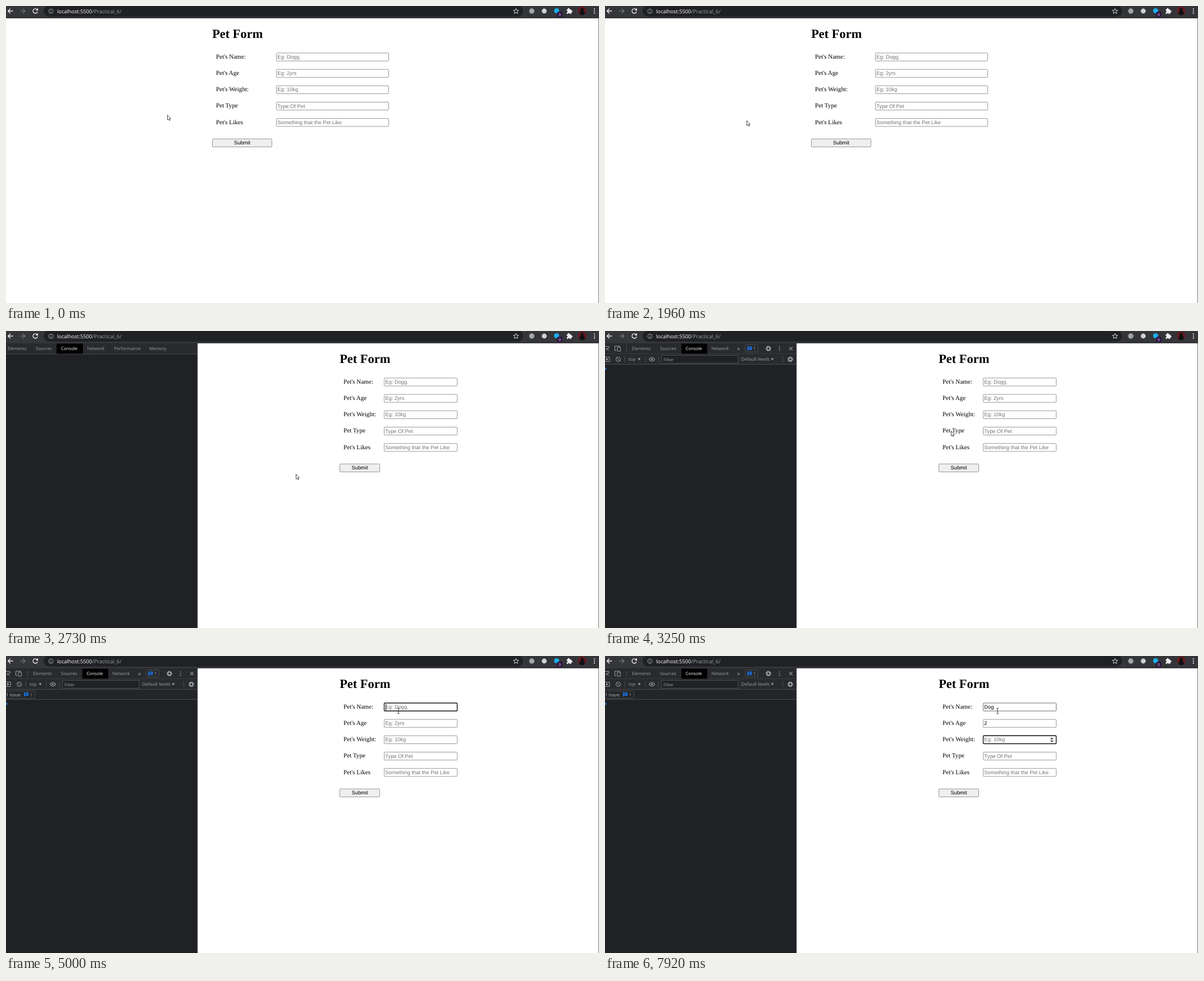
Recreate the animation shown at these times as an HTML page. Size 1056x530 px, loop 8000 ms.

```html
<!DOCTYPE html>
<html lang="en">
<head>
<meta charset="utf-8">
<title>Pet Form</title>
<style>
  html, body { margin: 0; width: 100%; height: 100%; overflow: hidden; background: #fff; }
  svg { display: block; width: 1056px; height: 530px; }
  text { text-rendering: geometricPrecision; white-space: pre; }
  .h1 { font: bold 22.4px "Liberation Serif", serif; }
  .label { font: 11.15px "Liberation Serif", serif; }
  .field { font: 9.33px "Liberation Sans", sans-serif; }
  .hint { fill: #757575; }
  .url { font: 9.25px "Open Sans", sans-serif; fill: #9aa0a6; }
  .ui { font: 7.8px "Open Sans", sans-serif; fill: #9aa0a6; }
  .on { fill: #fff; }
  .box { stroke: #767676; stroke-width: .75; }
  .hover { stroke: #3c3c3c; }
  .ring { stroke: #101010; stroke-width: 1.4; }
  .line { fill: none; stroke: #9aa0a6; }
</style>
</head>
<body>
<svg id="stage" viewBox="0 0 1056 530"></svg>
<script>
const LOOP = 8000;
const PITCH = 29.2;
const FIELDS = [
  ["Pet's Name:", 'Eg: Dogg.'],
  ["Pet's Age", 'Eg: 2yrs'],
  ["Pet's Weight:", 'Eg: 10kg'],
  ['Pet Type', 'Type Of Pet'],
  ["Pet's Likes", 'Something that the Pet Like'],
];

// time, x, y, shape
const POINTER = [
  [0, 287, 194], [80, 284, 204],
  [290, 276, 209], [340, 261, 213], [390, 247, 215], [440, 238, 213], [490, 235, 207],
  [740, 230, 207], [830, 235, 211],
  [1960, 252, 204], [2005, 290, 196], [2050, 350, 190], [2095, 420, 191], [2140, 478, 196],
  [2185, 509, 207, 'beam'], [2230, 522, 226], [2275, 520, 245], [2320, 516, 255],
  [2790, 530, 247], [2980, 562, 221], [3110, 600, 193],
  [3250, 616, 178], [3320, 635, 158], [3390, 655, 138], [3460, 672, 121],
  [3530, 688, 108], [3600, 699, 98, 'beam'], [3700, 702, 97, 'beam'],
  [3860, 701, 98, 'beam'], [4010, 700, 98, 'beam'], [4120, 699, 98, 'beam'],
];
// time, field, value
const EDITS = [
  [4010, 0, ''], [5410, 0, 'D'], [5590, 0, 'Do'], [5790, 0, 'Dog'],
  [6050, 1, ''], [7270, 1, '2'], [7400, 2, ''],
];
const CARET_OFF = [[4520, 5000], [6610, 7110], [7920, LOOP]];

const text = (x, y, s, cls, extra = '') => `<text x="${x}" y="${y}" class="${cls}" ${extra}>${s}</text>`;
const path = (d, stroke, extra = '') => `<path d="${d}" fill="none" stroke="${stroke}" ${extra}/>`;
const rect = (x, y, w, h, fill, extra = '') =>
  `<rect x="${x}" y="${y}" width="${w}" height="${h}" fill="${fill}" ${extra}/>`;
const dot = (x, y, r, fill, extra = '') => `<circle cx="${x}" cy="${y}" r="${r}" fill="${fill}" ${extra}/>`;
const group = (id, body) => `<g id="${id}">${body}</g>`;
const inputBox = (x, y, w, fill, extra) => rect(x + .5, y, w, 14.2, fill, 'rx="1.3" ' + extra);

function star(x, y, r) {
  const pts = Array.from({ length: 10 }, (_, i) => {
    const a = Math.PI * (i / 5 - .5), d = i % 2 ? r * .45 : r;
    return (x + d * Math.cos(a)).toFixed(2) + ',' + (y + d * Math.sin(a)).toFixed(2);
  });
  return `<polygon points="${pts.join(' ')}" fill="none" stroke="#d5d6d8"/>`;
}

function gear(x, y) {
  return dot(x, y, 2.9, 'none', 'stroke="#9aa0a6" stroke-width="2"') +
    dot(x, y, 4.3, 'none', 'stroke="#9aa0a6" stroke-width="1.3" stroke-dasharray="1.7 1.677"');
}

const dots = (x, y, gap, r, fill) => [-1, 0, 1].map(k => dot(x, y + k * gap, r, fill)).join('');

function badge(x, y) {
  return `<path d="M${x} ${y}h8v6h-6l-2 2z" fill="#1a73e8"/>` +
    path(`M${x + 1.6} ${y + 2}h4.8m-4.8 2h3.4`, '#202124', 'stroke-width=".9"');
}

function browserBar() {
  return rect(0, 0, 1056, 22, '#35363a') +
    rect(67, -1, 854, 20, '#202124', 'rx="10"') +
    path('M12.3 9H3.8M7.8 4.8L3.6 9l4.2 4.2', '#f1f1f1', 'stroke-width="1.3"') +
    path('M25 9h8.7M29.7 4.8L33.9 9l-4.2 4.2', '#7d7e81', 'stroke-width="1.2"') +
    path('M55.3 6.2A4.1 4.1 0 1 0 56.2 9.8', '#f1f1f1', 'stroke-width="1.3"') +
    '<path d="M57 3.8v4.2h-4.2z" fill="#f1f1f1"/>' +
    dot(80, 9.3, 4, 'none', 'stroke="#9aa0a6"') +
    path('M80 8.7v3M80 6.8v1', '#9aa0a6') +
    text(91, 12.7, '<tspan fill="#fff">localhost:5500</tspan>/Practical_6/', 'url') +
    star(908.3, 9.3, 5) +
    rect(926, -1, 88, 20, 'none', 'rx="10" stroke="#2b2c2f"') +
    dot(936.3, 9, 4.7, '#a3a5a7') +
    dot(958.5, 9, 4.4, '#d0d1d3') +
    dot(980.5, 8.5, 4.6, '#19aee8') +
    rect(981.5, 10.5, 9, 9, '#2c0b43', 'rx="2"') +
    text(986, 18, '0', 'ui on', 'text-anchor="middle" font-weight="bold" style="font-size:7px"') +
    rect(998.5, 6, 8, 8, '#f1f1f1', 'rx="1"') +
    dot(1002, 5.6, 1.8, '#f1f1f1') + dot(1007, 9.8, 1.8, '#f1f1f1') +
    dot(998.7, 10, 1.4, '#35363a') + dot(1002.3, 14, 1.4, '#35363a') +
    dot(1026, 8.5, 7.7, '#641a20') +
    '<path d="M1021.2 14.5q.5-6 3-6.5a2.6 2.6 0 1 1 3.6 0q2.5.5 3 6.5a7.7 7.7 0 0 1-9.6 0z" fill="#101012"/>' +
    dots(1047.8, 9, 3.7, 1.1, '#f1f1f1');
}

function form(id, x, fieldX, fieldW, btnW) {
  const rows = FIELDS.map(([label, hint], i) => {
    const dy = PITCH * i;
    return text(x + 7, 93.8 + dy, label, 'label') +
      inputBox(fieldX, 83.9 + dy, fieldW, '#fff', `class="box" id="${id}Box${i}"`) +
      text(fieldX + 2.3, 94 + dy, hint, 'field hint', `id="${id}Text${i}"`);
  });
  return group(id,
    text(x + .2, 57, 'Pet Form', 'h1') + rows.join('') +
    inputBox(x, 237.2, btnW - 1, '#efefef', 'class="box"') +
    text(x + btnW / 2, 247.2, 'Submit', 'field', 'text-anchor="middle"'));
}

function tabs(names, active) {
  return names.map(([name, x]) => text(x, 34.3, name, name === active ? 'ui on' : 'ui')).join('');
}

function devtools() {
  const blank = rect(90, 22.5, 47, 18, '#000') +
    tabs([['Elements', 3], ['Sources', 53], ['Console', 98], ['Network', 144.5],
      ['Performance', 192.5], ['Memory', 255]], 'Console');
  const bar = rect(0, 41, 341, 18, '#292a2d') + rect(0, 59, 341, 1, '#494c50') +
    rect(136, 22.5, 46, 18, '#000') +
    path('M7 31V27.5H-1M7 35.5L3 31.5M2.8 34.5V31H6.4', '#9aa0a6') +
    path('M20 35h-2.5v-8h8.5v2M22 29h5.5v7h-5.5z', '#9aa0a6') +
    path('M38.5 26v11', '#494c50') +
    tabs([['Elements', 48], ['Sources', 98], ['Console', 143.5], ['Network', 189.5]], 'Console') +
    gear(291, 31.3) + dots(310.7, 31.3, 3.2, .9, '#9aa0a6') +
    path('M328 28.3l6 6m0-6l-6 6', '#9aa0a6', 'stroke-width="1.1"') +
    path('M-1 46.5H8v8H-1', '#9aa0a6') + '<path d="M2 48l4 2.5-4 2.5z" fill="#9aa0a6"/>' +
    dot(23.5, 50.5, 4, 'none', 'class="line"') + path('M20.8 47.7l5.4 5.6', '#9aa0a6') +
    path('M35.5 45v11M72 45v11M95 45v11M316.5 45v11', '#494c50') +
    text(42, 53.3, 'top', 'ui') + '<path d="M58.5 48.5h5l-2.5 4z" fill="#9aa0a6"/>' +
    path('M78.5 50.5q5-7 10 0q-5 7-10 0z', '#9aa0a6', 'stroke-width="1.2"') + dot(83.5, 50.5, 1.6, '#9aa0a6') +
    rect(100.5, 43.5, 136.5, 14, '#202124', 'stroke="#494c50"') +
    text(104, 53.5, 'Filter', 'ui') +
    text(242.5, 53.3, 'Default levels', 'ui', 'style="font-size:8.1px"') +
    '<path d="M295.5 48.5h5l-2.5 4z" fill="#9aa0a6"/>' + gear(330, 50.5);
  const early = text(237, 34.3, 'Performance', 'ui', 'id="perf"');
  const count = text(235, 34.5, '»', 'ui', 'style="font-size:11px"') +
    rect(249.5, 24.5, 23, 13, 'none', 'rx="2" stroke="#494c50"') + badge(253.5, 27.7) + text(264, 34.3, '1', 'ui');
  const issue = rect(0, 60, 341, 17, '#242528') + rect(0, 77, 341, 1, '#494c50') +
    rect(-5, 62.5, 56.5, 13, 'none', 'rx="2" stroke="#494c50"') +
    text(0, 71.8, '1 Issue:', 'ui', 'style="fill:#bdc1c6"') + badge(32, 65) + text(42.5, 71.8, '1', 'ui');
  return group('tools',
    rect(0, 22, 341, 508, '#202124') + rect(0, 22, 341, 19, '#292a2d') + rect(0, 40.5, 341, 1, '#494c50') +
    group('blank', blank) +
    group('console', bar + early + group('count', count) + group('issue', issue) +
      path('M-1 82.8L2 85.3L-1 87.8', '#2f80ed', 'id="prompt" stroke-width="1.4"')) +
    rect(340.7, 22, .6, 508, '#494c50'));
}

const spinner = '<path d="M792.8 90l2.9-3.2 2.9 3.2zM792.8 92.4l2.9 3.2 2.9-3.2z" fill="#404040"/>';

document.getElementById('stage').innerHTML =
  rect(0, 0, 1056, 530, '#fff') + rect(1055, 22, 1, 508, '#77787a') + browserBar() +
  form('wide', 367, 481, 200, 107) + form('slim', 594, 673, 130, 72) +
  group('focus',
    inputBox(673, 83.9, 130, 'none', 'class="ring"') +
    rect(676, 86, 1, 11, '#000', 'id="caret" shape-rendering="crispEdges"') +
    group('spin', spinner)) +
  devtools() +
  group('arrow', '<path d="M.5 .5V9.3L2.5 7.5L3.9 10.5L5.2 9.9L3.9 7H6.5Z" fill="#fff" stroke="#222" stroke-width=".8"/>') +
  group('beam', path('M-2 -4.8H-.6L0 -4.2L.6 -4.8H2M0 -4.2V4.2M-2 4.8H-.6L0 4.2L.6 4.8H2', '#222', 'stroke-width=".9"'));

const $ = id => document.getElementById(id);
const show = (id, on) => { $(id).style.display = on ? '' : 'none'; };
const last = (list, t) => list.filter(e => e[0] <= t).pop();

function drawPointer(t) {
  const [, x, y, shape = 'arrow'] = last(POINTER, t);
  show('arrow', shape === 'arrow');
  show('beam', shape === 'beam');
  $(shape).setAttribute('transform', `translate(${x} ${y})`);
  $('wideBox4').classList.toggle('hover', shape === 'beam');
  $('slimBox0').classList.toggle('hover', shape === 'beam');
}

function drawFields(t) {
  for (let i = 0; i < 3; i++) {
    const edit = last(EDITS.filter(e => e[1] === i), t);
    const value = edit ? edit[2] : '';
    const el = $('slimText' + i);
    el.textContent = value || FIELDS[i][1];
    el.classList.toggle('hint', !value);
  }
  const now = last(EDITS, t);
  show('focus', now);
  if (!now) return;
  const [, row, value] = now;
  $('focus').setAttribute('transform', `translate(0 ${PITCH * row})`);
  $('caret').setAttribute('x', 676 + (value ? Math.round($('slimText' + row).getComputedTextLength()) : 0));
  show('caret', !CARET_OFF.some(([a, b]) => t >= a && t < b));
  show('spin', row > 0);
}

function render(t) {
  const open = t >= 2730, loaded = t >= 2790, counted = t >= 3110, issue = t >= 3390;
  show('wide', !open);
  show('slim', open);
  show('tools', open);
  show('blank', !loaded);
  show('console', loaded);
  show('perf', !counted);
  show('count', counted);
  show('issue', issue);
  $('prompt').setAttribute('transform', `translate(0 ${issue ? 0 : -18})`);
  drawFields(t);
  drawPointer(t);
}

const start = performance.now();
function tick() {
  render((performance.now() - start) % LOOP);
  requestAnimationFrame(tick);
}
tick();
</script>
</body>
</html>
```
